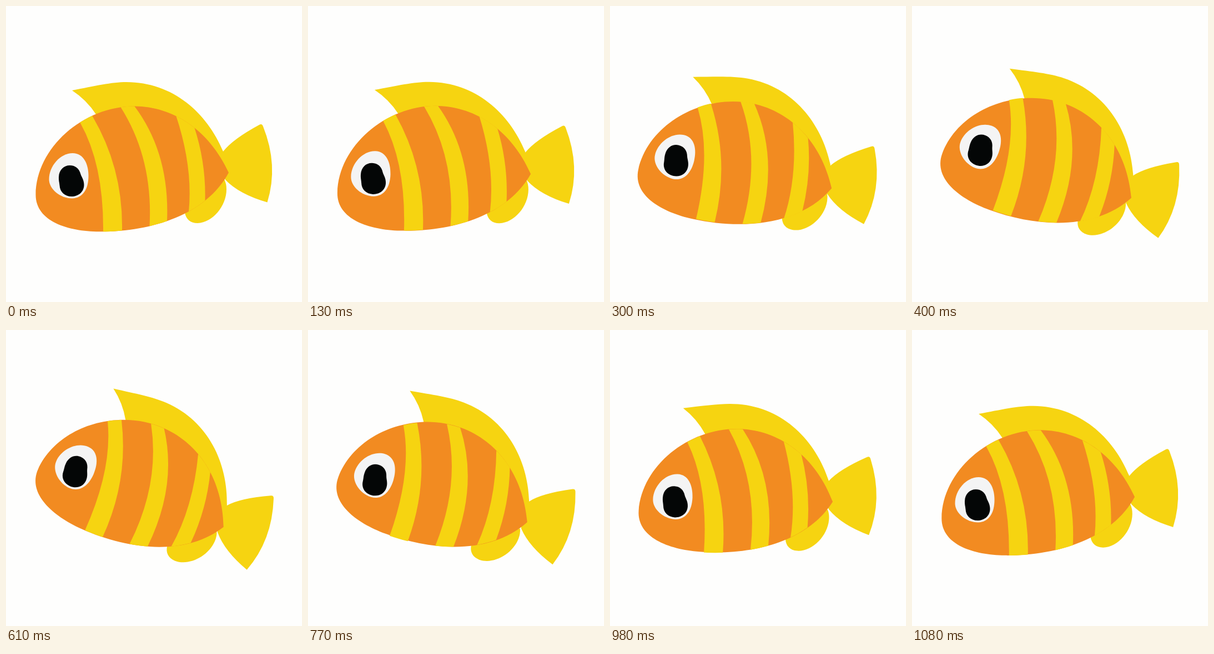
An HTML page with a canvas for the animation above (1.11 s loop, 533 px wide and 533 px high).

```html
<!DOCTYPE html>
<html lang="en">
<head>
<meta charset="utf-8">
<title>Swaying fish</title>
<style>
  html, body { margin: 0; width: 100%; height: 100%; overflow: hidden; background: #fefefd; }
  canvas { display: block; width: 533px; height: 533px; }
</style>
</head>
<body>
<canvas id="stage" width="533" height="533"></canvas>
<script>
const ctx = document.getElementById('stage').getContext('2d');
const LOOP = 1110, STEP = 3.37;          // loop in ms, step in hundredths of a second
const SWING = 23.8 * Math.PI / 180;
const PIVOT = [266.5, 305.3];
const YELLOW = '#f6d411', ORANGE = '#f28b21', WHITE = '#f4f4f4', BLACK = '#040606';

const body = new Path2D(`M401 300 C365 222 300 181 232 180.5 C140 180 54 255 53.5 340
  C53.5 388 112 406 168 406.3 C260 407 360 376.5 401 300Z`);
const fin = new Path2D(`M119 152 C160 144 190 137 217 137 C300 137 362 192 391 262
  L397 290 L250 260 L175 215 L162 195 Q145 169 119 152Z`);
const tail = new Path2D(`M385 272 L391 262 Q408 240 456 214 Q461 211 463 217
  Q491 287 470.5 353.5 Q420 339 395 313 L385 290Z`);
const belly = new Path2D(`M322 372 C324 384 332 391 345 391 C372 390 397 360 397 330
  Q397 320 393 312 L340 340Z`);
const bands = new Path2D(`M128 199 L134 211 Q176 286 175 406 V416 H209 V404 Q211 293 156 199 L150 188Z
  M199 169 L207 183 Q265 275 258.5 396 V408 H290 V387 Q295 265 231 180 L224 170Z
  M303 187 L306 197 Q337 290 329 371 L328 385 L358 375 L358.5 349 Q360 282 339 218 L335 205Z`);
const eye = new Path2D(`M120 265 C140 265 148.5 285 148.5 306 C148.5 330 138 346 119 346.5
  C98 346.5 77.5 330 77.5 312 C77.5 288 98 265 120 265Z`);
const pupil = new Path2D(`M115 287 C125 287 132 293 134.5 303 C136 308 140.5 313 140.5 322
  C140.5 335 130 343 118 343 C106 343 97 335 96.5 323 C96 317 94.8 315 95 308 C95.5 295 104 287 115 287Z`);

// Each layer: shape, colour, then the steps at which it rises and falls.
const layers = [
  { shape: tail, color: YELLOW, up: [2.5, 15.9], down: [18.5, 33.2] },
  { shape: belly, color: YELLOW, up: [3.1, 16.3], down: [19, 33.4] },
  { shape: fin, color: YELLOW, up: [3, 16], down: [18.7, 33.2] },
  { shape: body, color: ORANGE, up: [2.2, 15.7], down: [18, 33] },
  { shape: bands, color: YELLOW, up: [2.1, 15.3], down: [17.5, 32.8], clip: body },
  { shape: eye, color: WHITE, up: [1.9, 15.1], down: [16.6, 32] },
  { shape: pupil, color: BLACK, up: [1.9, 14.6], down: [16.6, 32] }
];

function ease(k, [from, to]) {
  const p = Math.min(1, Math.max(0, (k - from) / (to - from)));
  return (1 - Math.cos(Math.PI * p)) / 2;
}

function drawLayer({ shape, color, up, down, clip }, k) {
  ctx.save();
  ctx.translate(...PIVOT);
  ctx.rotate(SWING * (ease(k, up) - ease(k, down)));
  ctx.translate(-PIVOT[0], -PIVOT[1]);
  if (clip) ctx.clip(clip);
  ctx.fillStyle = color;
  ctx.fill(shape);
  ctx.restore();
}

function draw(ms) {
  const k = Math.floor((Math.floor(ms / 10) + 0.5) / STEP);
  ctx.fillStyle = '#fefefd';
  ctx.fillRect(0, 0, 533, 533);
  for (const layer of layers) drawLayer(layer, k);
}

const start = performance.now();
function tick() {
  draw((performance.now() - start) % LOOP);
  requestAnimationFrame(tick);
}
tick();
</script>
</body>
</html>
```
